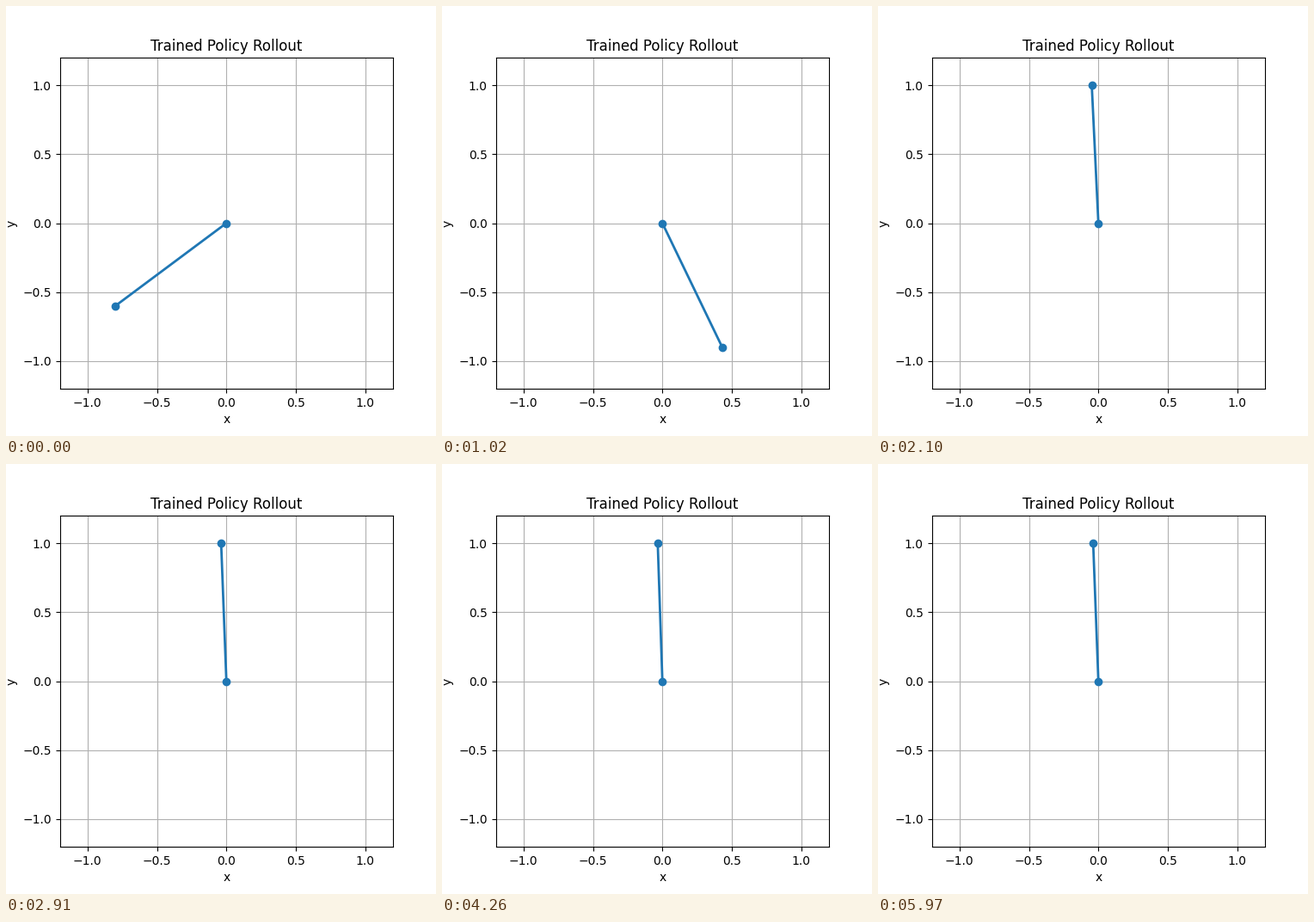
These frames come from a looping animation (500x500 px, 6 s). A matplotlib script:

```python
import numpy as np
import matplotlib.pyplot as plt
from matplotlib.animation import FuncAnimation

FRAMES = 200
INTERVAL = 30
DT = 0.05        # simulated seconds per frame
GRAVITY = 15.0   # 3g / 2l for a unit rod
GAIN = 3.0       # 3 / (m l^2)

# (frame, angle from hanging straight down) reached by the swing-up
START = -0.9273
WAYPOINTS = [(21, 2.068), (34, 0.447), (42, -1.73)]

REST = 0.036     # final lean from upright
DECAY = 3.4      # rate of approach to upright
SWAY = 0.0025


def swing(angle, speed, torque, steps):
    """Integrate the pendulum under a constant torque."""
    path = []
    for _ in range(steps):
        speed += (GAIN * torque - GRAVITY * np.sin(angle)) * DT
        angle += speed * DT
        path.append(angle)
    return path, speed


def solve_torque(angle, speed, goal, steps):
    """Bisect for the torque that brings the rod to the goal angle."""
    low, high = -4.0, 4.0
    for _ in range(50):
        mid = (low + high) / 2
        if swing(angle, speed, mid, steps)[0][-1] < goal:
            low = mid
        else:
            high = mid
    return (low + high) / 2


def rollout():
    angles, speed = [START], 0.0
    for frame, goal in WAYPOINTS:
        steps = frame - (len(angles) - 1)
        torque = solve_torque(angles[-1], speed, goal, steps)
        path, speed = swing(angles[-1], speed, torque, steps)
        angles += path

    # Settle just left of upright with a slight sway
    last = len(angles) - 1
    n = np.arange(last + 1, FRAMES)
    gap = np.pi + angles[-1] - REST
    lean = REST + gap * np.exp(-DECAY * DT * (n - last))
    lean -= SWAY * np.cos(2 * np.pi * (n - 142) / 17)
    return np.concatenate([angles, lean - np.pi])


angles = rollout()

fig, ax = plt.subplots(figsize=(5, 5), dpi=100)
ax.set_xlim(-1.2, 1.2)
ax.set_ylim(-1.2, 1.2)
ax.set_title("Trained Policy Rollout")
ax.set_xlabel("x")
ax.set_ylabel("y")
ax.grid(True)
rod, = ax.plot([], [], "o-", lw=2)


def update(i):
    rod.set_data([0, np.sin(angles[i])], [0, -np.cos(angles[i])])
    return rod,


anim = FuncAnimation(fig, update, frames=FRAMES, interval=INTERVAL,
                     repeat=True, repeat_delay=0)
plt.show()
```
